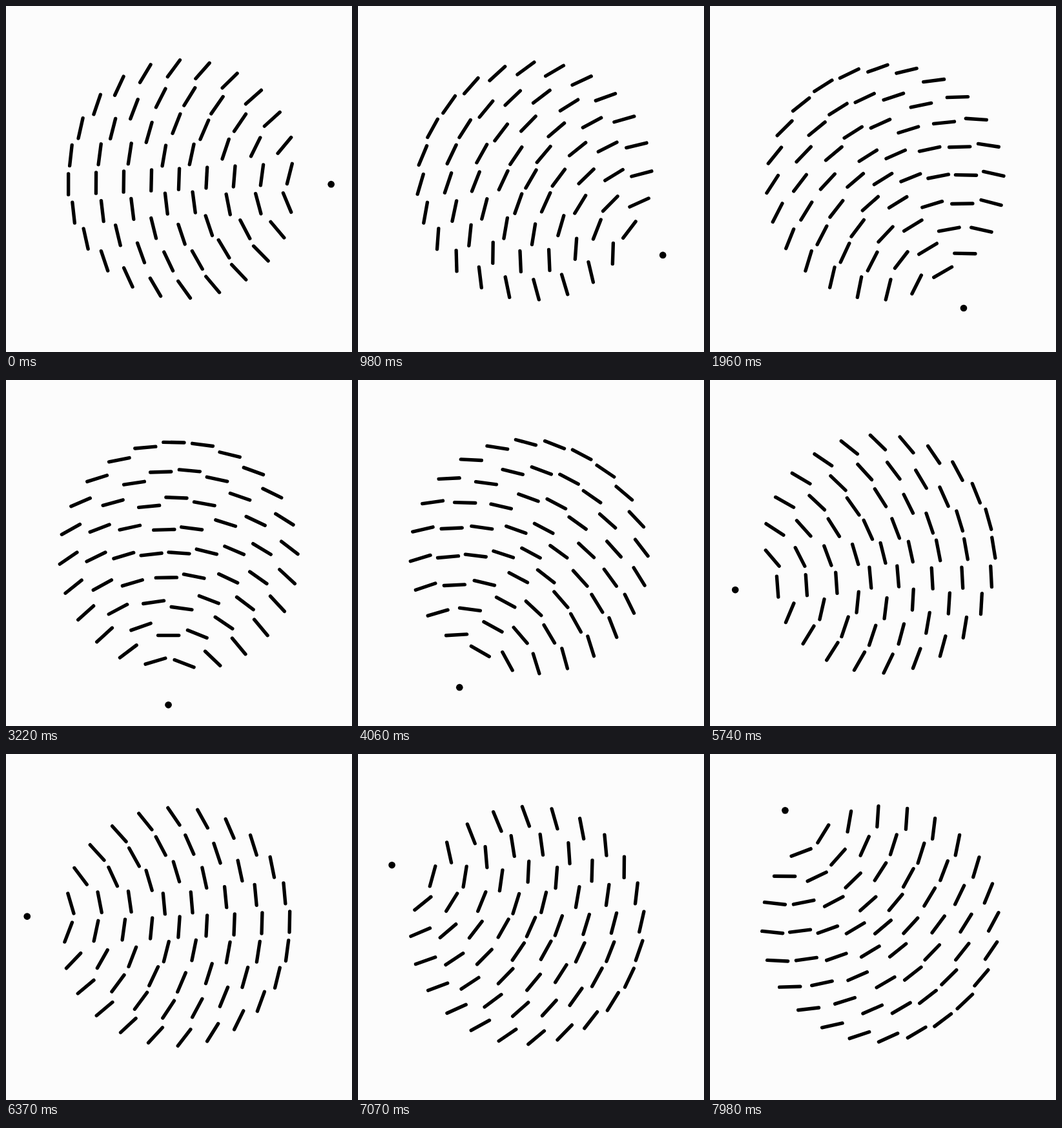
An HTML page for the animation above (8 s loop, 536 by 536 pixels).

```html
<!DOCTYPE html>
<html lang="en">
<head>
<meta charset="utf-8">
<title>Needles around a dot</title>
<style>
  html, body { margin: 0; width: 100%; height: 100%; overflow: hidden; background: #fcfcfc; }
  svg { display: block; width: 100%; height: 100%; }
  line { stroke: #000; stroke-width: 1; stroke-linecap: round; }
</style>
</head>
<body>
<svg viewBox="-50 -50 100 100"></svg>
<script>
  const LOOP = 8000, STEP = 70;
  const ORBIT = 44, RING_GAP = 8, HALF = 3;
  const RAD = Math.PI / 180;
  const svg = document.querySelector('svg');

  function add(tag, attrs) {
    const el = document.createElementNS('http://www.w3.org/2000/svg', tag);
    for (const key in attrs) el.setAttribute(key, attrs[key]);
    return svg.appendChild(el);
  }

  // One needle in the middle, then rings of 6, 12, 18 and 24.
  const needles = [];
  for (let ring = 0; ring <= 4; ring++) {
    const count = ring * 6 || 1;
    for (let i = 0; i < count; i++) {
      const a = 1 + i / count * 2 * Math.PI;
      const x = ring * RING_GAP * Math.cos(a);
      const y = ring * RING_GAP * Math.sin(a);
      needles.push({ x, y, el: add('line', { y1: -HALF, y2: HALF }) });
    }
  }
  const dot = add('circle', { r: 1 });

  // The dot orbits in 2 degree steps; every needle stays square to it.
  function draw(time) {
    const step = Math.floor(time % LOOP / STEP);
    const a = (2 + 2 * step) * RAD;
    const dx = ORBIT * Math.cos(a), dy = ORBIT * Math.sin(a);
    dot.setAttribute('cx', dx);
    dot.setAttribute('cy', dy);
    for (const { x, y, el } of needles) {
      const turn = Math.atan2(dy - y, dx - x) / RAD;
      el.setAttribute('transform', `translate(${x} ${y}) rotate(${turn})`);
    }
  }

  const start = performance.now();
  function tick() {
    draw(performance.now() - start);
    requestAnimationFrame(tick);
  }
  draw(0);
  requestAnimationFrame(tick);
</script>
</body>
</html>
```
